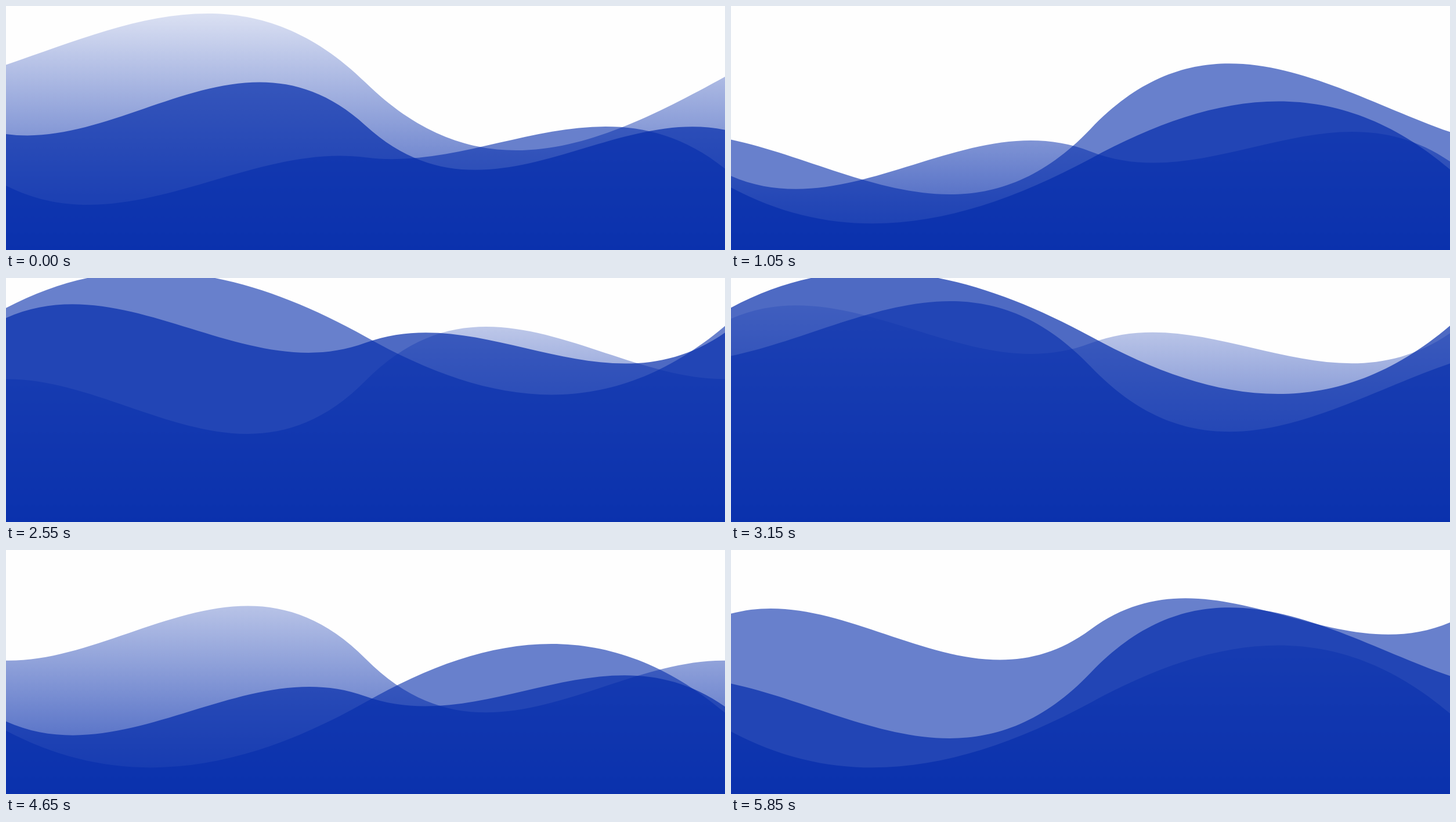
Write an HTML page with a canvas that moves like this. It is 1239 px wide and 421 px high and loops after 5.95 s.

```html
<!DOCTYPE html>
<html lang="en">
<head>
<meta charset="utf-8">
<title>Waves</title>
<style>
  html, body { margin: 0; width: 100%; height: 100%; overflow: hidden; background: #fefefe; }
  canvas { display: block; }
</style>
</head>
<body>
<canvas id="stage" width="1239" height="421"></canvas>
<script>
const W = 1239, H = 421;
const LOOP = 5950, STEP = 150;
const SPEED = 1.5;                 // radians per second
const REST = 182;                  // mean water level
const RAD = Math.PI / 180;
const START = -126 * RAD, LAG = 52.5 * RAD;
const INK = "5,45,172";

const ctx = document.getElementById("stage").getContext("2d");

// Swing of each evenly spaced curve point: [in phase, quarter turn later]
const SWING = [
  [137, 0], [251, 4], [137, 212], [85, 0],
  [32, -212], [-76, -11], [105, -2]
];

const fade = ctx.createLinearGradient(0, 0, 0, H);
fade.addColorStop(0, `rgba(${INK},0.12)`);
fade.addColorStop(1, `rgba(${INK},0.82)`);

const layers = [fade, `rgba(${INK},0.7)`, `rgba(${INK},0.6)`];

function drawWave(fill, angle) {
  const c = Math.cos(angle), s = Math.sin(angle);
  const p = SWING.map(([u, v], i) => [i * W / 6, REST + u * c + v * s]);
  ctx.beginPath();
  ctx.moveTo(...p[0]);
  ctx.bezierCurveTo(...p[1], ...p[2], ...p[3]);
  ctx.bezierCurveTo(...p[4], ...p[5], ...p[6]);
  ctx.lineTo(W, H);
  ctx.lineTo(0, H);
  ctx.closePath();
  ctx.fillStyle = fill;
  ctx.fill();
}

function draw(ms) {
  const t = Math.floor((ms % LOOP) / STEP) * STEP / 1000;
  ctx.fillStyle = "#fefefe";
  ctx.fillRect(0, 0, W, H);
  layers.forEach((fill, i) => drawWave(fill, START + SPEED * t + i * LAG));
}

const begin = performance.now();
function tick() {
  draw(performance.now() - begin);
  requestAnimationFrame(tick);
}
tick();
</script>
</body>
</html>
```
